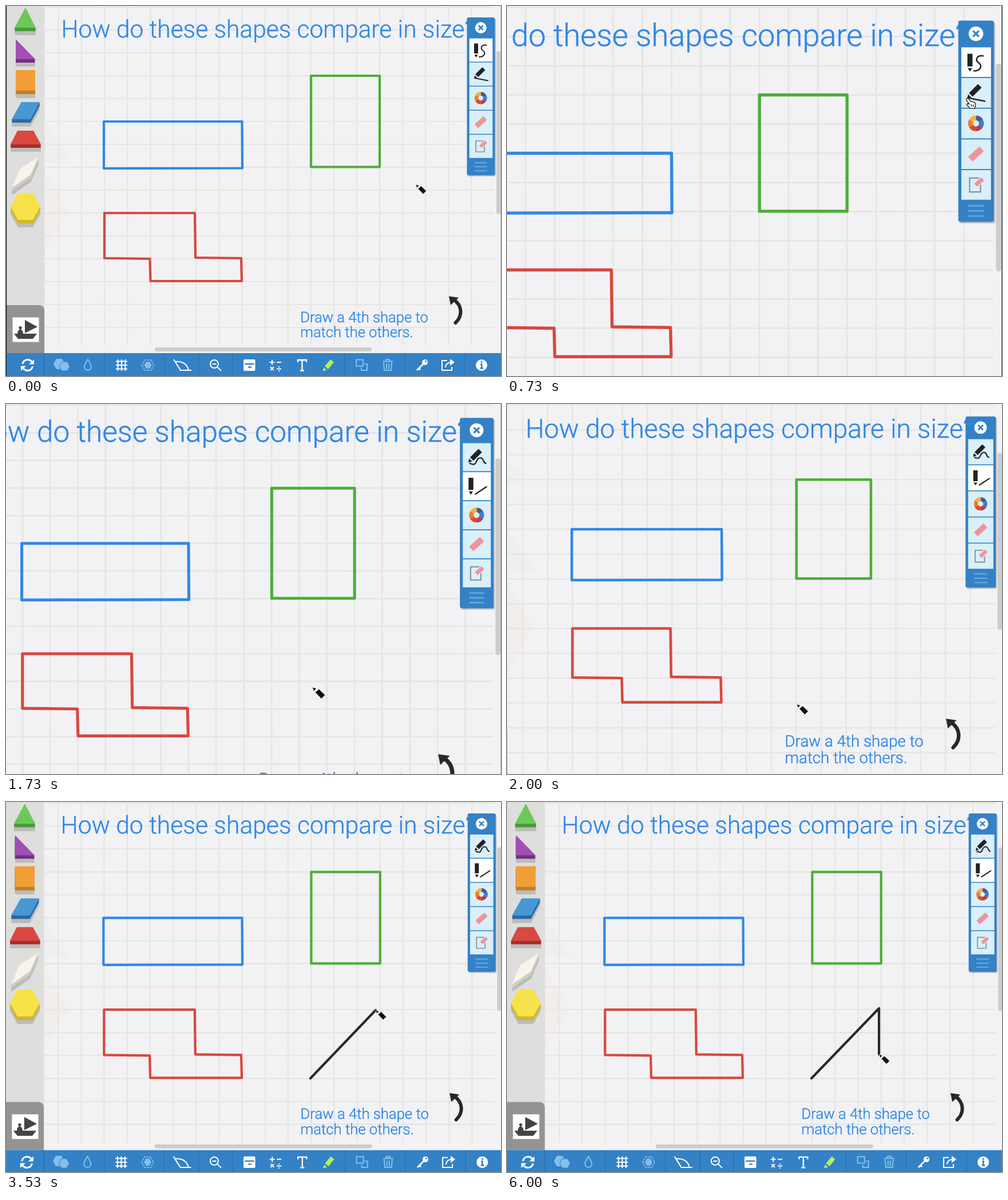
An HTML page that plays this animation: 865 by 647 pixels, repeating every 6.66 s.

```html
<!DOCTYPE html>
<html lang="en">
<head>
<meta charset="utf-8">
<title>Compare shapes</title>
<style>
html, body { margin: 0; height: 100%; overflow: hidden; background: #f2f2f4; }
svg { display: block; width: 100vw; height: 100vh; }
text { font-family: Roboto, sans-serif; font-weight: 300; fill: #3087e8; stroke: #3087e8; stroke-width: .45; text-rendering: geometricPrecision; }
.line { fill: none; stroke-width: 4.2; stroke-linejoin: round; stroke-linecap: round; }
.w { fill: none; stroke: #fff; stroke-width: 2; }
.dim { fill: none; stroke: #84bfeb; stroke-width: 2; }
.ink { fill: none; stroke: #262626; stroke-width: 2; stroke-linecap: round; }
</style>
</head>
<body>
<svg viewBox="0 0 865 647" preserveAspectRatio="none">
<defs>
  <path id="marker" d="M0 0h7v17.500h-7zM.5 19.500h6l-3 5z" fill="#222"/>
  <g id="slant"><use href="#marker" transform="translate(832.500 65) rotate(45)"/></g>
</defs>
<g id="cam">
  <rect x="-10" y="-10" width="890" height="670" fill="#f2f2f4"/>
  <path d="M68 290L109 360L68 428z" fill="#f0955a" opacity=".06"/>
  <path d="M68 205L114 272H68zM68 95L90 112L68 135z" fill="#a88" opacity=".03"/>
  <path id="grid" stroke="#e6e6e4" stroke-width="2.400"/>
  <rect x="857" y="79" width="7.500" height="285" rx="3.500" fill="#cdcdcf"/>
  <rect x="260" y="597" width="379" height="7" rx="3.500" fill="#cdcdcd"/>
  <path d="M865.300 0V660" stroke="#222"/>

  <text x="96.500" y="54.800" font-size="42.500">How do these shapes compare in size?</text>
  <text font-size="25.600"><tspan x="514.200" y="552.500">Draw a 4th shape to</tspan><tspan x="514.200" y="578.800">match the others.</tspan></text>

  <path class="line" stroke="#3087e8" d="M171 202H412.500L413 283.500L171 284z"/>
  <path class="line" stroke="#4dae37" d="M533 122H653V281.500H533z"/>
  <path class="line" stroke="#d8473f" d="M172 362H330L331 440L411 441L412 481H252.500L251.500 442L172 441z"/>
  <path class="line" stroke="#282828" style="stroke-width:6" d="M785.500 554C798 542 798 524 782 513"/>
  <path d="M774 507.500L791 510L777 523z" fill="#282828"/>
  <path id="stroke" class="line" stroke="#282828"/>

  <!-- shape tray -->
  <rect x="0" y="0" width="67.500" height="608" fill="#dededd"/>
  <g id="tray"></g>
  <path d="M1 523H57Q67 523 67 533V607H1z" fill="#939393"/>
  <rect x="11.500" y="544.500" width="46" height="43" fill="#fff"/>
  <path d="M14 573H54L47 582H21zM20 573Q20 567 24 566Q20 561 25 560Q30 561 26 566Q30 567 30 573zM33 549L55 561L33 572z" fill="#444"/>
  <rect width="1.200" height="660" fill="#111"/>

  <!-- bottom bar -->
  <rect x="1" y="607" width="866" height="50" fill="#3481c6"/>
  <path d="M67 607v50M172.500 607v50M277 607v50M337 607v50M396 607v50M592 607v50M697 607v50M802 607v50" stroke="#2a6eb0" stroke-width="1.200"/>
  <path class="w" style="stroke-width:3" d="M29 626a9 9 0 0 1 16-4M46.500 630a9 9 0 0 1-16 4"/>
  <path d="M49 618v8.500h-9zM26 638v-8.500h9z" fill="#fff"/>
  <g fill="#84bfeb">
    <path d="M83 626l5-9h10l5 9-5 9H88z"/>
    <path d="M93 630l4.500-8h9.500l4.500 8-4.500 8h-9.500z" stroke="#3481c6"/>
    <path d="M241.500 628l3.500-6h6l3.500 6-3.500 6h-6z"/>
  </g>
  <path class="dim" d="M143 618c4 6 6 9 6 13a6 6 0 0 1-12 0c0-4 2-7 6-13z"/>
  <path class="dim" stroke-dasharray="3 1.500" d="M237.500 628l5.200-9h10.600l5.200 9-5.200 9h-10.600z"/>
  <path class="w" d="M195.500 618v20M202 618v20M208.500 618v20M192 621.500h20M192 628h20M192 634.500h20M293 618l12 19h19M295 622q19-2 24 14"/>
  <circle class="w" cx="364" cy="626" r="7"/>
  <path class="w" d="M360.500 626h7M369 631l7 7"/>
  <rect x="415" y="618" width="20.500" height="20" rx="2" fill="#fff"/>
  <path d="M417 626h16.500M423 631.500h6" stroke="#3481c6" stroke-width="2.400"/>
  <path class="w" d="M460.500 623h9M465 618.500v9M473 623h8M462 631l6 6m0-6l-6 6M473 634.500h8M477 630v2M477 637v2"/>
  <path class="w" style="stroke-width:2.400" d="M510 623v-4h15v4M517.500 619v18M514 637.500h7"/>
  <path d="M557 630l10-12 6 5-10 12zM555.500 632l5 4.500-7 2z" fill="#b3f158"/>
  <path class="dim" d="M612 618.500h12v11h-12zM626 626h5v11h-10v-5M658 621.500h18M664 621v-3h6v3M660 623l1 14h12l1-14M665 625v10M669 625v10"/>
  <circle cx="732" cy="623" r="5" fill="#fff"/><circle cx="733.500" cy="621.500" r="1.500" fill="#3481c6"/>
  <path class="w" style="stroke-width:2.800" d="M729 626l-11 11M721 633l3 3"/>
  <path class="w" d="M771 620h-9v17h17v-6M768 632q0-8 10-9"/>
  <path d="M776 617l8 6-8 6z" fill="#fff"/>
  <circle cx="831" cy="628" r="10" fill="#fff"/>
  <path d="M831 621v3M829 626.500h2.200v6.500M828.500 633.500h5.500" stroke="#3481c6" stroke-width="2.600" fill="none"/>

  <!-- drawing tools -->
  <rect x="807" y="22" width="49" height="276" rx="3" fill="#000" opacity=".22"/>
  <rect x="805.500" y="20" width="48.800" height="276" rx="3" fill="#3481c6"/>
  <circle cx="829.700" cy="38" r="10" fill="#fff"/>
  <path d="M825.700 34l8 8m0-8l-8 8" stroke="#3481c6" stroke-width="2.600"/>
  <g id="cells"></g>
  <g id="free">
    <use href="#marker" x="818" y="65.500"/>
    <path class="ink" d="M839.500 68.500C831 67 828 74 833.500 78C839 82 836 89 827 89"/>
    <use href="#slant" y="42"/>
    <path class="ink" d="M819 126L842 130.500"/>
  </g>
  <g id="straight">
    <use href="#slant"/>
    <path class="ink" d="M820 86C832 92 827 78 835 78C841 78 838 85 843 86"/>
    <use href="#marker" x="818" y="107"/>
    <path class="ink" d="M828 130.500L844 120"/>
  </g>
  <g id="wheel" fill="none" stroke-width="6.500"></g>
  <g fill="#f0949a">
    <rect x="-10.500" y="-4.500" width="21" height="9" rx="1" transform="translate(829.700 203) rotate(-42)"/>
    <path class="ink" style="stroke:#8a8f94;stroke-width:1.700" d="M833 236H821V255H836V246"/>
    <rect x="-6.500" y="-3" width="13" height="6" rx="1" transform="translate(834 241.500) rotate(-42)"/>
  </g>
  <path d="M819 274h21.500M819 281h21.500M819 288h21.500" stroke="#5fa6db" stroke-width="2.400"/>

  <path id="pen" d="M0 0L6 2L2 6zM4 7.500L9.500 2.800L18.500 11.500L13 17z" fill="#111" stroke="#fff" stroke-width=".6"/>
  <path id="hand" d="M.5.5Q-1 2 0 3.500L3.500 8.500L1 8Q-1 9 1 10.500L5 14.500H11L12 11V7.500L9.500 5.500L5.500 5L2.500 1Q1.500 0 .5.500zM6 9l1 3M8.500 9l1 3" fill="#fff" stroke="#222" stroke-width="1.100"/>
</g>
</svg>
<script>
const $ = id => document.getElementById(id);
const LOOP = 6660, STEP = LOOP / 100;

let d = '';
for (let x = 92; x < 850; x += 40.07) d += `M${x} 0V594`;
for (let y = 1.8; y < 590; y += 40.02) d += `M68 ${y}H853`;
$('grid').setAttribute('d', d);

// each tile: outline, face colour, side colour
const tiles = [
  ['34,3 15,38 52,38', '#6cc957', '#4a9a3e'],
  ['17,58 17,93 51,93', '#a14fb2', '#71307f'],
  ['17,112 51,112 51,148 17,148', '#f09e38', '#bf7e2a'],
  ['27,168 59,168 43,198 10,198', '#4798d5', '#2a69a6'],
  ['20,218 48,218 61,242 8,242', '#d94841', '#a42e2b'],
  ['57,263 43,295 10,318 24,285', '#f8f4ec', '#d2cec6'],
  ['21,327 47,327 60,351 47,374 21,374 8,351', '#f8e24a', '#cfb72c']
];
for (const [points, face, side] of tiles)
  for (let depth = 13; depth >= 0; depth--) {
    const fill = depth > 6 ? '#bcbcba' : depth ? side : face;
    $('tray').innerHTML += `<polygon points="${points}" fill="${fill}" transform="translate(0 ${depth})"/>`;
  }

for (let i = 0; i < 5; i++)
  $('cells').innerHTML += `<rect x="809.700" y="${56.7 + 42.1 * i}" width="40.600" height="40.600"/>`;
const cells = $('cells').children;

['#46589c', '#3c7fce', '#b5434a', '#dd4a2f', '#ee7d2d', '#f2b33b'].forEach((c, i) => {
  $('wheel').innerHTML += `<path d="M0-7.500A7.500 7.500 0 0 1 6.600-3.600" stroke="${c}" transform="translate(829.700 161) rotate(${i * 60})"/>`;
});

const mix = (a, b, k) => a + (b - a) * k;
const part = (t, a, b) => Math.min(1, Math.max(0, (t - a) / (b - a)));
const ease = (t, a, b) => { const k = part(t, a, b); return k * k * (3 - 2 * k); };

const START = [531.6, 481.8], TOP = [649.3, 359.6];
// pointer: start time, end time, x, y
const moves = [
  [0, 320, 817, 126], [1420, 1860, 533.5, 484],
  [2790, 3490, 645, 363], [3490, 3800, 650, 361]
];
const descent = [
  [4540, 650, 361], [4720, 647, 376], [5000, 639.5, 411], [5260, 642.5, 437.5],
  [5460, 646.5, 439], [5560, 646.5, 439], [5660, 649.3, 440]
];

function pointer(t) {
  let x = 716, y = 312;
  for (const [a, b, px, py] of moves) {
    const k = ease(t, a, b);
    x = mix(x, px, k);
    y = mix(y, py, k);
  }
  for (let i = 1; i < descent.length; i++) {
    const k = part(t, descent[i - 1][0], descent[i][0]);
    x = mix(x, descent[i][1], k);
    y = mix(y, descent[i][2], k);
  }
  return [x, y];
}

function draw(now) {
  const t = Math.floor((now % LOOP + 7) / STEP) * STEP;
  const zoom = ease(t, 210, 717), back = ease(t, 1450, 2310);
  const s = mix(1 + .275 * zoom, 1.003, back);
  const tx = mix(-238.4 * zoom, -1.2, back);
  $('cam').setAttribute('transform', `translate(${tx} 0) scale(${s})`);

  const second = t > 1190;
  $('free').style.display = second ? 'none' : '';
  $('straight').style.display = second ? '' : 'none';
  for (let i = 0; i < 5; i++)
    cells[i].setAttribute('fill', i === +second ? '#fff' : '#d9eff9');

  const [x, y] = pointer(t), over = x > 805;
  $('pen').style.display = over ? 'none' : '';
  $('hand').style.display = over ? '' : 'none';
  $(over ? 'hand' : 'pen').setAttribute('transform', `translate(${x} ${y})`);

  let path = '';
  if (t > 2870) path = `M${START}L` + (t < 4450 ? [x, y] : t < 4590 ? TOP : `${TOP}L${[x, y]}`);
  $('stroke').setAttribute('d', path);
  requestAnimationFrame(() => draw(performance.now() - begin));
}
const begin = performance.now();
draw(0);
</script>
</body>
</html>
```
